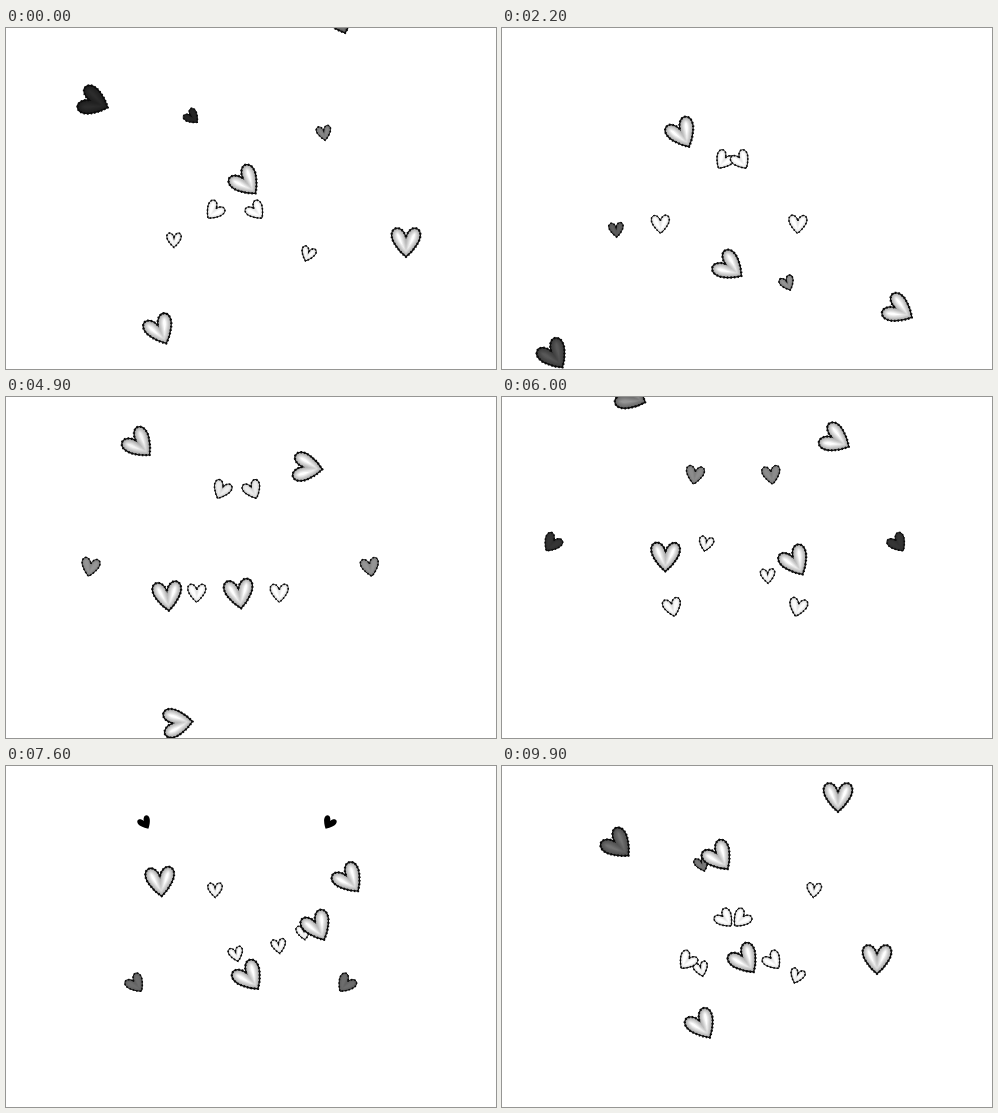
An HTML page with a canvas for the animation above (10 s loop, 490 by 341 pixels).

```html
<!DOCTYPE html>
<html lang="en">
<head>
<meta charset="utf-8">
<title>Drifting hearts</title>
<style>
html, body { margin: 0; width: 100%; height: 100%; overflow: hidden; background: #fff; }
canvas { display: block; }
</style>
</head>
<body>
<canvas id="stage" width="490" height="341"></canvas>
<script>
const ctx = document.getElementById('stage').getContext('2d');
const LOOP = 10000, STEP = 100, LAST = 9.9;
const BIG = 15, MEDIUM = 9.6, SMALL = 7.8;
const FADE = 2.9, BRIGHT = 3;
const hearts = [];

// Poses are [x, y, degrees], evenly spaced in time; `left` is the life remaining at the end.
function fly(r, born, end, left, ...poses) {
  hearts.push({ r, born, end, left, poses });
}

// Two mirrored hearts; poses are [axis, half gap, y, degrees].
function pair(born, end, left, ...poses) {
  for (const side of [-1, 1]) {
    fly(MEDIUM, born, end, left, ...poses.map(([axis, gap, y, deg]) => [axis + side * gap, y, -side * deg]));
  }
}

// already in flight
fly(BIG, 0, 0.5, 0, [88, 74, -68], [77, 72, -72]);
fly(BIG, 0, 0.4, 1.2, [334, -9, -20], [333, -22, -20]);
fly(SMALL, 0, 0.45, 0, [186, 89, -45], [181, 86, -50]);
fly(SMALL, 0, 1.55, 0, [318, 105, -10], [322, 80, -15]);
fly(SMALL, 0, 3.3, 0, [168, 212, 0], [128, 204, -3], [86, 198, -10]);
fly(SMALL, 0, 3.9, 0, [302, 226, 20], [288, 251, -20], [262, 291, -50]);
fly(BIG, 0, 3.2, 0, [154, 302, -25], [77, 322, -32], [15, 333, -40]);
fly(BIG, 0, 4.4, BRIGHT, [400, 214, 0], [397, 282, -60], [372, 392, -60]);

// falling, rising and spreading from the middle
fly(BIG, 0, 5.6, BRIGHT, [240, 154, -40], [219, 260, -60], [150, 345, -110]);
fly(BIG, 1, 6.6, 1.1, [218, 105, -40], [146, 81, -30], [131, -32, -85]);
fly(BIG, 2.8, 7.5, BRIGHT, [206, 96, -115], [310, 65, -78], [358, -12, -25]);
pair(0, 6.6, 0, [229, 21, 183, 40], [226, 96, 191, -5], [222, 192, 130, 55]);
pair(1.2, 7.6, 0, [230, 24, 148, 25], [231, 9, 100, 30], [231, 92, 57, -30]);
pair(2.9, 8.85, 0, [230, 18, 151, 22], [233, 60, 209, -12], [236, 147, 213, -60]);

// climbing
fly(BIG, 4.5, LAST, 1.3, [159, 215, -10], [158, 125, -2], [116, 79, -45]);
fly(BIG, 4.6, LAST, BRIGHT, [213, 205, 0], [336, 125, -38], [336, 31, 0]);
fly(SMALL, 5, LAST, 1.4, [196, 163, 20], [209, 126, 0], [200, 98, -20]);
fly(SMALL, 5.2, LAST, BRIGHT, [243, 180, 5], [297, 167, -10], [312, 124, 5]);

// sinking
fly(BIG, 6.5, LAST, BRIGHT, [281, 145, -40], [375, 193, 0]);
fly(BIG, 6.6, LAST, BRIGHT, [262, 190, -38], [200, 259, -32]);
fly(SMALL, 6.8, LAST, BRIGHT, [241, 183, -15], [199, 203, -15]);
fly(SMALL, 6.9, LAST, BRIGHT, [266, 171, -18], [295, 210, 20]);

// last burst
fly(BIG, 9.1, LAST, BRIGHT, [236, 122, -38], [217, 91, -36]);
fly(BIG, 9.1, LAST, BRIGHT, [252, 168, -38], [243, 194, -36]);
pair(9.2, LAST, BRIGHT, [231, -6, 168, 45], [231, -8, 153, 42]);
pair(9, LAST, BRIGHT, [229, 20, 187, 42], [228, 43, 195, 38]);

// Smooth curve through two or three evenly spaced poses.
function poseAt({ born, end, poses }, t) {
  const u = (t - born) / (end - born), n = poses.length - 1;
  return [0, 1, 2].map(k => poses.reduce((sum, pose, i) => {
    let w = 1;
    for (let j = 0; j <= n; j++) if (j !== i) w *= (u * n - j) / (i - j);
    return sum + w * pose[k];
  }, 0));
}

function heartPath(r) {
  const p = new Path2D();
  p.moveTo(0, -0.35 * r);
  p.bezierCurveTo(0.12 * r, -0.8 * r, 0.5 * r, -1.08 * r, 0.78 * r, -0.92 * r);
  p.bezierCurveTo(1.12 * r, -0.72 * r, 1.02 * r, -0.2 * r, 0.78 * r, 0.15 * r);
  p.bezierCurveTo(0.58 * r, 0.48 * r, 0.3 * r, 0.8 * r, 0, 1.03 * r);
  p.bezierCurveTo(-0.3 * r, 0.8 * r, -0.58 * r, 0.48 * r, -0.78 * r, 0.15 * r);
  p.bezierCurveTo(-1.02 * r, -0.2 * r, -1.12 * r, -0.72 * r, -0.78 * r, -0.92 * r);
  p.bezierCurveTo(-0.5 * r, -1.08 * r, -0.12 * r, -0.8 * r, 0, -0.35 * r);
  p.closePath();
  return p;
}
const shapes = new Map([BIG, MEDIUM, SMALL].map(r => [r, heartPath(r - 0.6)]));

function outline(shape, width, color, dash = []) {
  ctx.lineWidth = width;
  ctx.strokeStyle = color;
  ctx.setLineDash(dash);
  ctx.stroke(shape);
}

function drawHeart(h, t) {
  const [x, y, deg] = poseAt(h, t);
  const level = Math.min(1, (h.end + h.left - t) / FADE);
  const shape = shapes.get(h.r), isBig = h.r === BIG;
  ctx.save();
  ctx.translate(x, y);
  ctx.rotate(deg * Math.PI / 180);
  if (level < 0.08) {
    ctx.scale(0.72, 0.72);
    ctx.fillStyle = '#000';
    ctx.fill(shape);
  } else {
    const grey = Math.round(254 * level);
    ctx.fillStyle = `rgb(${grey},${grey},${grey})`;
    ctx.fill(shape);
    ctx.save();
    ctx.clip(shape);
    for (let w = isBig ? 11 : 5; w > 2; w -= 2) outline(shape, w, `rgba(0,0,0,${isBig ? 0.07 : 0.05})`);
    ctx.restore();
    // a solid line with a dashed one on top gives the ragged rim
    outline(shape, isBig ? 1.3 : 0.9, '#0a0a0a');
    outline(shape, isBig ? 2.3 : 1.6, '#0a0a0a', [1.5, 2]);
  }
  ctx.restore();
}

function frame(now) {
  const t = Math.floor((now % LOOP) / STEP) * STEP / 1000;
  ctx.fillStyle = '#fff';
  ctx.fillRect(0, 0, 490, 341);
  for (const h of hearts) if (t >= h.born && t <= h.end) drawHeart(h, t);
  requestAnimationFrame(frame);
}
frame(0);
</script>
</body>
</html>
```
